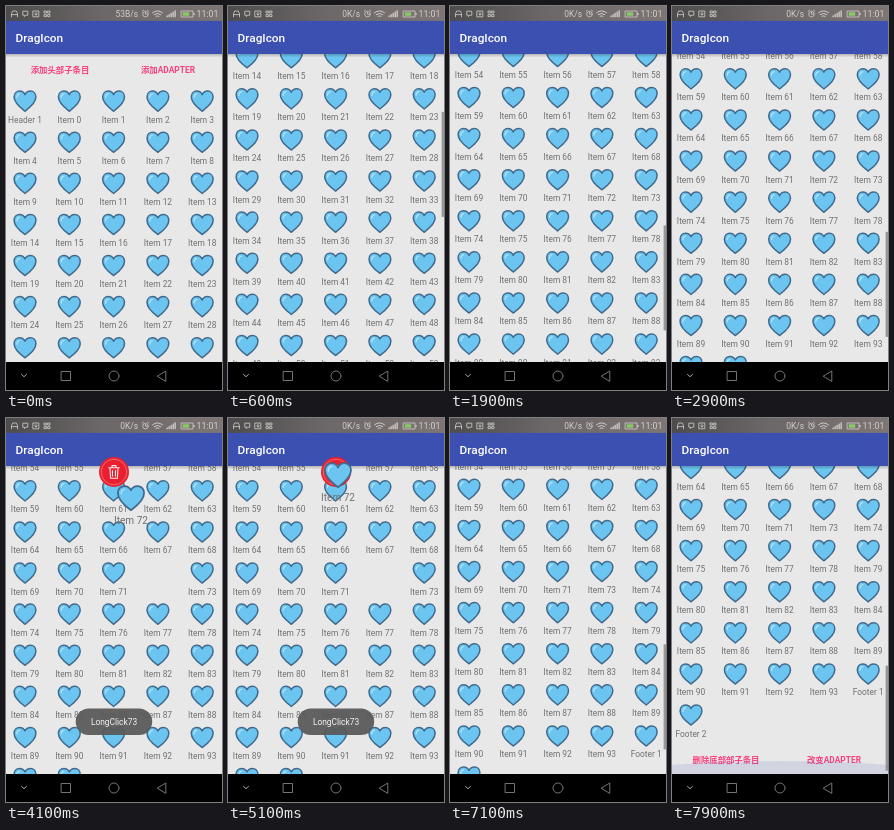
Recreate the animation shown at these times as an HTML page with a canvas. Size 216 by 384 pixels, loop 8 s.

```html
<!DOCTYPE html>
<html lang="zh">
<head>
<meta charset="utf-8">
<title>DragIcon</title>
<style>
html, body { margin: 0; width: 100%; height: 100%; overflow: hidden; background: #000; }
canvas { display: block; width: 216px; height: 384px; }
</style>
</head>
<body>
<canvas id="stage"></canvas>
<script>
const W = 216, H = 384, LOOP = 8000;
const TOP = 48, BOTTOM = 356;
const ROW = 41.1, COL = 44.3, PER_ROW = 5;
const REMOVED = 73, COUNT = 97;
const FONT = 'Roboto, "Noto Sans CJK SC", "Noto Sans CJK", sans-serif';

const canvas = document.getElementById('stage');
const ctx = canvas.getContext('2d');
const dpr = window.devicePixelRatio || 1;
canvas.width = W * dpr;
canvas.height = H * dpr;

const heartPath = new Path2D('M0 10.2C-3.2 7.8-10.9 2.4-10.9-3.9C-10.9-7.6-8.4-9.9-5.5-9.9C-3-9.9-1-8.6 0-6.4C1-8.6 3-9.9 5.5-9.9C8.4-9.9 10.9-7.6 10.9-3.9C10.9 2.4 3.2 7.8 0 10.2Z');
const shinePath = new Path2D('M-8.1-3.4C-8.1-5.7-7-6.9-5.3-7.1');
const binPath = new Path2D('M-5.2-4.2H5.2M-2-4.4V-6.4H2V-4.4M-4-4L-3.4 6.3H3.4L4-4M-1.5-1.5V4M1.5-1.5V4');
const statusPath = new Path2D('M5.5 10.8V7.6L6.7 5H10.3L11.5 7.6V10.8M5.5 8.6H11.5M17.2 5.2H21.8V9.2H19.6L18.4 10.6V9.2H17.2ZM27.2 5H32.8V10.8H27.2ZM30 6.2V9M28.8 7.8L30 9.2L31.2 7.8M38.4 5H40.4V7H38.4ZM42 5H44V7H42ZM38.4 8.6H40.4V10.6H38.4ZM42 8.6H44V10.6H42Z');
const alarmPath = new Path2D('M142.3 8.1A2.8 2.8 0 1 1 136.7 8.1A2.8 2.8 0 1 1 142.3 8.1M139.5 6.4V8.2H141M136.2 5.2L137.5 4.1M142.8 5.2L141.5 4.1');
const wifiPath = new Path2D('M146.5 6.8Q151.5 2.8 156.5 6.8M148.2 8.6Q151.5 6 154.8 8.6M150 10.3Q151.5 9.2 153 10.3');
const chevronPath = new Path2D('M15.5 368.4L18 370.7L20.5 368.4');
const navPath = new Path2D('M55.5 365.5H64.5V374.5H55.5ZM113 370A5 5 0 1 1 103 370A5 5 0 1 1 113 370M151.5 370L159.8 365V375Z');

const clamp = v => Math.max(0, Math.min(1, v));
const span = (t, a, b) => clamp((t - a) / (b - a));
const mix = (a, b, p) => a + (b - a) * p;
const ease = p => (1 - Math.cos(Math.PI * p)) / 2;

// Smooth monotone curve through [time, value] points
function curve(keys, t) {
  const last = keys.length - 1;
  if (t <= keys[0][0]) return keys[0][1];
  if (t >= keys[last][0]) return keys[last][1];
  const rate = i => (keys[i + 1][1] - keys[i][1]) / (keys[i + 1][0] - keys[i][0]);
  const slope = i => {
    if (i === 0 || i === last) return 0;
    const a = rate(i - 1), b = rate(i);
    return a * b <= 0 ? 0 : 2 * a * b / (a + b);
  };
  let i = 0;
  while (t > keys[i + 1][0]) i++;
  const h = keys[i + 1][0] - keys[i][0];
  const u = (t - keys[i][0]) / h, v = 1 - u;
  return v * v * (1 + 2 * u) * keys[i][1] + u * u * (3 - 2 * u) * keys[i + 1][1]
    + h * u * v * (v * slope(i) - u * slope(i + 1));
}

const scrollKeys = [[120, 0], [300, 45], [1100, 365.8], [1900, 496.8], [2650, 515.5],
  [6950, 515.5], [7100, 517], [7400, 556], [7750, 579]];
const dragX = [[3600, 152], [4100, 125], [4500, 110]];
const dragY = [[3600, 155], [4100, 80], [4500, 57]];

function text(str, x, y, size, color, weight = 400, align = 'center') {
  ctx.font = `${weight} ${size}px ${FONT}`;
  ctx.textAlign = align;
  ctx.textBaseline = 'alphabetic';
  ctx.fillStyle = color;
  ctx.fillText(str, x, y + size * 0.36);
}

function stroke(path, color, width) {
  ctx.strokeStyle = color;
  ctx.lineWidth = width;
  ctx.stroke(path);
}

function disc(x, y, r, color) {
  ctx.fillStyle = color;
  ctx.beginPath();
  ctx.arc(x, y, r, 0, 7);
  ctx.fill();
}

function label(k) {
  if (k === 0) return 'Header 1';
  return k < 95 ? `Item ${k - 1}` : `Footer ${k - 94}`;
}

function icon(k, x, y, scale = 1) {
  ctx.save();
  ctx.translate(x, y);
  ctx.scale(scale, scale);
  ctx.fillStyle = '#6bc5f0';
  ctx.fill(heartPath);
  stroke(heartPath, '#426a8c', 1.5);
  stroke(shinePath, '#b4e2f7', 1.2);
  text(label(k), 0, 18.6, 8.4, '#707070');
  ctx.restore();
}

const slot = k => ({ x: 19 + COL * (k % PER_ROW), y: 95 + ROW * Math.floor(k / PER_ROW) });

function drawList(t, scroll) {
  ctx.save();
  ctx.beginPath();
  ctx.rect(0, TOP, W, BOTTOM - TOP);
  ctx.clip();
  ctx.fillStyle = '#e8e8e8';
  ctx.fillRect(0, TOP, W, BOTTOM - TOP);

  const button = (str, x, y) => text(str, x, y - scroll, 8.4, '#f5427f', 700);
  button('添加头部子条目', 54, 63.5);
  button('添加ADAPTER', 162, 63.5);
  button('删除底部部子条目', 54, 920.5);
  button('改变ADAPTER', 162, 920.5);

  for (let k = 0; k < COUNT; k++) {
    if (k === REMOVED && t >= 3450) continue;
    let { x, y } = slot(k);
    if (k > REMOVED) {
      const start = 5371 + 30 * (k - REMOVED - 1);
      const p = ease(span(t, start, start + 300));
      const to = slot(k - 1);
      x = mix(x, to.x, p);
      y = mix(y, to.y, p);
    }
    y -= scroll;
    if (y > TOP - 30 && y < BOTTOM + 15) icon(k, x, y);
  }

  const glow = span(t, 7600, 7800);
  if (glow > 0) {
    ctx.fillStyle = 'rgba(63,81,181,0.13)';
    ctx.beginPath();
    ctx.ellipse(108, BOTTOM, 150, 13 * glow, 0, 0, 7);
    ctx.fill();
  }

  const bar = t < 5000 ? span(t, 120, 200) * (1 - span(t, 2950, 3200)) : span(t, 6900, 7000);
  ctx.fillStyle = `rgba(125,125,125,${0.75 * bar})`;
  ctx.fillRect(213.6, TOP + 0.5 + scroll * 0.344, 2.4, 105);

  const shade = ctx.createLinearGradient(0, TOP, 0, TOP + 3.5);
  shade.addColorStop(0, 'rgba(0,0,0,0.22)');
  shade.addColorStop(1, 'rgba(0,0,0,0)');
  ctx.fillStyle = shade;
  ctx.fillRect(0, TOP, W, 4);
  ctx.restore();
}

function drawBars(t) {
  ctx.fillStyle = '#3c50b1';
  ctx.fillRect(0, 14.5, W, TOP - 14.5);
  text('DragIcon', 9.6, 32.2, 11.8, '#fff', 500, 'left');

  const back = ctx.createLinearGradient(0, 0, W, 0);
  back.addColorStop(0, '#4e4c4c');
  back.addColorStop(0.45, '#6c6768');
  back.addColorStop(1, '#7d7573');
  ctx.fillStyle = back;
  ctx.fillRect(0, 0, W, 14.8);
  const pale = '#d2cfcd';
  stroke(statusPath, pale, 0.8);
  stroke(alarmPath, pale, 0.8);
  stroke(wifiPath, pale, 1);
  text(t < 600 ? '53B/s' : '0K/s', 132, 8, 8.4, pale, 400, 'right');
  ctx.fillStyle = pale;
  for (let i = 0; i < 5; i++) ctx.fillRect(160.5 + i * 2, 9.5 - i * 1.3, 1.3, 1.7 + i * 1.3);
  ctx.strokeStyle = pale;
  ctx.lineWidth = 0.8;
  ctx.strokeRect(175.5, 5, 11.5, 6);
  ctx.fillRect(187.4, 7, 1.2, 2);
  ctx.fillStyle = '#8cc46a';
  ctx.fillRect(176.7, 6.2, 6.5, 3.6);
  text('11:01', 212.5, 8, 8.8, pale, 400, 'right');

  ctx.fillStyle = '#000';
  ctx.fillRect(0, BOTTOM, W, H - BOTTOM);
  stroke(chevronPath, '#a8a8a8', 1);
  stroke(navPath, '#828282', 0.9);
}

function drawDrag(t) {
  if (t < 3450 || t > 5350) return;
  const show = ease(span(t, 3450, 3650)) * (1 - ease(span(t, 5200, 5350)));
  ctx.save();
  ctx.translate(108, 54);
  ctx.scale(show, show);
  disc(0, 0, 15, '#e9202f');
  ctx.strokeStyle = 'rgba(255,190,190,0.55)';
  ctx.lineWidth = 0.8;
  ctx.beginPath();
  ctx.arc(0, 0, 12.8, 0, 7);
  ctx.stroke();
  stroke(binPath, '#fbe9e9', 1.1);
  ctx.restore();

  const scale = mix(1, 1.2, ease(span(t, 3450, 3600))) * (1 - span(t, 5100, 5300));
  if (scale > 0) icon(REMOVED, curve(dragX, t), curve(dragY, t), scale);
}

function drawToast(t) {
  const alpha = span(t, 3650, 3850) * (1 - span(t, 5850, 6100));
  if (alpha <= 0) return;
  ctx.save();
  ctx.globalAlpha = alpha;
  ctx.fillStyle = 'rgba(90,90,90,0.94)';
  ctx.beginPath();
  ctx.roundRect(69.7, 290.5, 76.5, 26.5, 13.2);
  ctx.fill();
  text('LongClick' + REMOVED, 108, 304, 8.4, '#f4f4f4');
  ctx.restore();
}

function draw(t) {
  ctx.setTransform(dpr, 0, 0, dpr, 0, 0);
  ctx.lineJoin = ctx.lineCap = 'round';
  drawList(t, curve(scrollKeys, t));
  drawBars(t);
  drawDrag(t);
  drawToast(t);
}

const begin = performance.now();
function tick() {
  draw((performance.now() - begin) % LOOP);
  requestAnimationFrame(tick);
}
tick();
</script>
</body>
</html>
```
